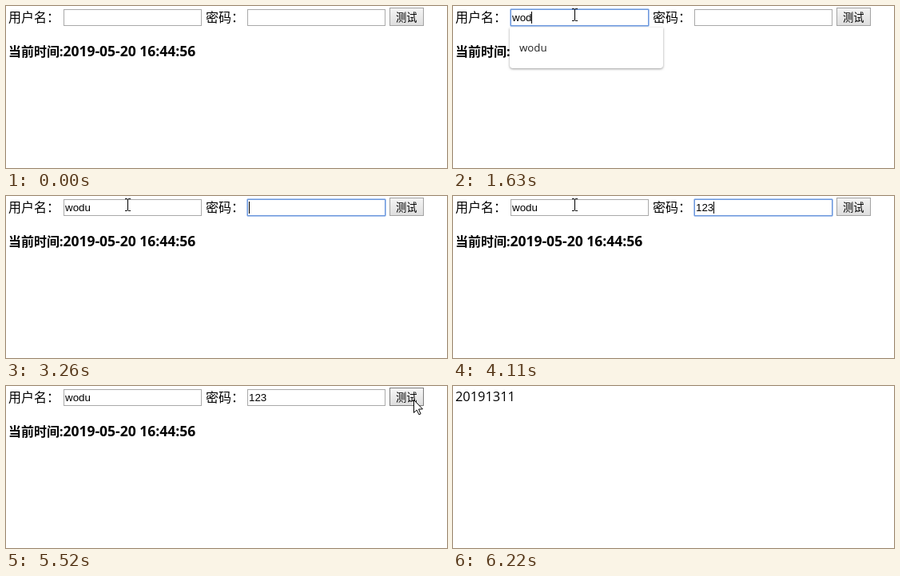
An HTML page with a canvas for the animation above (6750 ms loop, 552x203 px).

```html
<!DOCTYPE html>
<html lang="zh">
<head>
<meta charset="utf-8">
<title>登录测试</title>
<style>
  html, body { margin: 0; width: 552px; height: 203px; overflow: hidden; background: #fff; }
  canvas { display: block; }
</style>
</head>
<body>
<canvas id="stage" width="552" height="203"></canvas>
<script>
const LOOP = 6750;
const ctx = document.getElementById('stage').getContext('2d');
const CJK = '"Noto Sans CJK SC", "Noto Sans CJK", sans-serif';
const LATIN = '"Open Sans", "Noto Sans", sans-serif';
const FIELD = '13.333px "Liberation Sans", Arial, sans-serif';
const USERS = ['dou', 'wodu', 'tiansuo', 'wepiko'];
const NAME = USERS[1];
const USER_X = 72, PASS_X = 302;

// Last row of [time, ...values] already reached.
const at = (rows, t) => rows.reduce((last, row) => (t >= row[0] ? row : last));

const userText = [[0, ''], [1310, NAME.slice(0, 1)], [1400, NAME.slice(0, 2)],
  [1630, NAME.slice(0, 3)], [2090, NAME]];
const passText = [[0, ''], [3790, '1'], [3880, '12'], [4110, '123']];
const lists = [[0, []], [710, USERS], [1310, [USERS[1], USERS[3]]], [1400, [NAME]], [2090, []],
  [3840, ['123']], [4110, []]];
const focus = [[0, ''], [630, 'user'], [3260, 'pass'], [5440, '']];
const caret = [[0, false], [630, true], [1160, false], [1310, true], [2640, false],
  [3260, true], [4660, false], [5210, true]];
const crossing = [[4660, 152, 11], [4740, 205, 8], [4820, 318, 10], [4890, 375, 15],
  [4970, 420, 16], [5050, 462, 17], [5130, 490, 17], [5210, 504, 16], [5290, 510, 17]];

function text(str, x, y, font, color = '#000') {
  ctx.font = font;
  ctx.fillStyle = color;
  ctx.fillText(str, x, y);
}

function glide(u, x0, y0, x1, y1) {
  return [Math.round(x0 + (x1 - x0) * u), Math.round(y0 + (y1 - y0) * u)];
}

function pointer(t) {
  if (t < 70 || t >= 6220) return null;
  if (t < 630) {
    const u = Math.floor((t - 70) / 80) / 6;
    return glide(1 - (1 - u) ** 2, 222, 160, 152, 12);
  }
  if (t < 780) return [152, 12];
  if (t < 4660) return [152, 11];
  if (t < 5590) return at(crossing, t).slice(1);
  if (t < 6140) {
    const u = Math.min(1, (Math.floor((t - 5590) / 76.7) + 1) / 7);
    return glide(u ** 1.5, 510, 17, 358, 159);
  }
  return [273, 190];
}

function box(x, y, w, h, r) {
  ctx.beginPath();
  ctx.roundRect(x, y, w, h, r);
}

function field(x, value, active, showCaret, selected) {
  ctx.lineWidth = 1;
  if (active) {
    ctx.strokeStyle = '#a9c4ee';
    box(x - 0.5, 3.5, 174, 22, 1.5);
    ctx.stroke();
  }
  ctx.strokeStyle = active ? '#6d98dc' : '#a9a9a9';
  ctx.strokeRect(x + 0.5, 4.5, 172, 20);
  ctx.font = FIELD;
  const end = ctx.measureText(value).width;
  if (selected) {
    ctx.fillStyle = '#3390ff';
    ctx.fillRect(x + 2, 7, end, 15);
  }
  text(value, x + 2, 19, FIELD, selected ? '#fff' : '#000');
  if (active && showCaret) ctx.fillRect(x + 2 + Math.round(end), 7, 1, 15);
}

function button(hover) {
  const fill = ctx.createLinearGradient(0, 2, 0, 25);
  fill.addColorStop(0, hover ? '#f8f8f8' : '#f5f5f5');
  fill.addColorStop(1, hover ? '#dcdcdc' : '#dddddd');
  ctx.fillStyle = fill;
  ctx.fillRect(480, 2, 43, 23);
  ctx.lineWidth = 1;
  ctx.strokeStyle = hover ? '#7d7d7d' : '#a3a3a3';
  ctx.strokeRect(480.5, 2.5, 42, 22);
  text('测试', 488, 19, '13.333px ' + CJK);
}

function dropdown(x, items) {
  if (!items.length) return;
  ctx.save();
  ctx.shadowColor = 'rgba(0,0,0,.4)';
  ctx.shadowBlur = 3;
  ctx.shadowOffsetY = 1;
  ctx.fillStyle = '#fff';
  box(x - 1, 27, 192, 15 + items.length * 36, [0, 0, 4, 4]);
  ctx.fill();
  ctx.restore();
  items.forEach((item, i) => text(item, x + 11, 57 + i * 36, '13.3px ' + LATIN, '#222'));
}

function beam(x, y) {
  ctx.fillStyle = '#000';
  ctx.fillRect(x, y - 7, 1, 14);
  for (const edge of [y - 8, y + 7]) {
    ctx.fillRect(x - 3, edge, 3, 1);
    ctx.fillRect(x + 1, edge, 3, 1);
  }
}

function arrow(x, y) {
  const path = [[0, 0], [0, 16], [3.7, 12.6], [6.4, 18.3], [8.6, 17.4], [6, 11.6], [11, 11.4]];
  ctx.beginPath();
  path.forEach(([dx, dy]) => ctx.lineTo(x + 0.5 + dx, y + 0.5 + dy));
  ctx.closePath();
  ctx.fillStyle = '#fff';
  ctx.fill();
  ctx.lineWidth = 1;
  ctx.strokeStyle = '#000';
  ctx.stroke();
}

function form(t) {
  const active = at(focus, t)[1];
  const blink = at(caret, t)[1];
  text('用户名：', 3, 20, '16px ' + CJK);
  text('密码：', 250, 20, '16px ' + CJK);
  text('当前时间', 3, 63, 'bold 16px ' + CJK);
  text(':', 67, 63, 'bold 16px ' + LATIN);
  text('2019-05-20 16:44:56', 71.5, 63, 'bold 17.5px ' + LATIN);
  field(USER_X, at(userText, t)[1], active === 'user', blink, t >= 3100 && t < 3260);
  field(PASS_X, at(passText, t)[1], active === 'pass', blink, false);
  button(t >= 5130 && t < 5670);
  dropdown(active === 'pass' ? PASS_X : USER_X, at(lists, t)[1]);
}

function draw(t) {
  ctx.fillStyle = '#fff';
  ctx.fillRect(0, 0, 552, 203);
  if (t < 5670) form(t);
  else text('20191311', 3, 19, '16.4px ' + LATIN);

  const spot = pointer(t);
  if (!spot) return;
  const [x, y] = spot;
  if (y < 26 && x < 478) beam(x, y);
  else arrow(x, y);
}

const start = performance.now();
function tick() {
  draw((performance.now() - start) % LOOP);
  requestAnimationFrame(tick);
}
tick();
</script>
</body>
</html>
```
